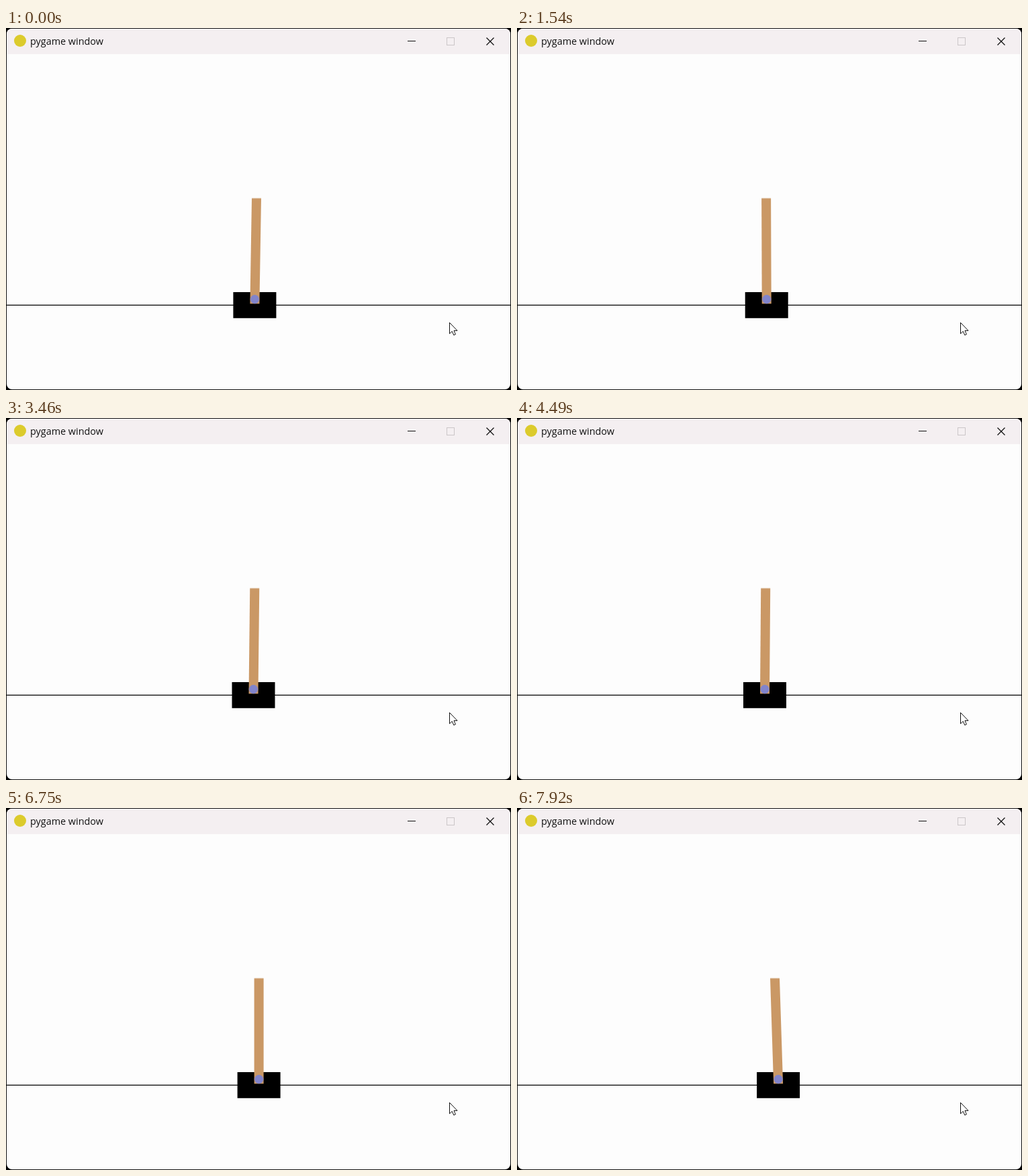
Write an HTML page that moves like this. It is 752 px wide and 540 px high and loops after 7.99 s.

```html
<!DOCTYPE html>
<html lang="en">
<head>
<meta charset="utf-8">
<title>Cart and pole</title>
<style>
  html, body { margin: 0; width: 100%; height: 100%; overflow: hidden; background: #000; }
  svg { display: block; width: 752px; height: 540px; }
  text { font: 14.4px "Open Sans", "Noto Sans", sans-serif; fill: #111; }
</style>
</head>
<body>
<svg viewBox="0 0 752 540">
  <defs>
    <clipPath id="frame"><rect x="1" y="1" width="750" height="538" rx="8"/></clipPath>
  </defs>
  <rect width="752" height="540"/>
  <rect x=".5" y=".5" width="751" height="539" rx="8.5" fill="#222"/>
  <g clip-path="url(#frame)">
    <rect width="752" height="540" fill="#fdfdfd"/>
    <rect width="752" height="39" fill="#f4eff1"/>
  </g>

  <circle cx="21" cy="19" r="9" fill="#dccb2c"/>
  <text x="36" y="25">pygame window</text>
  <g fill="none" stroke="#111">
    <path d="M598 19.5H610"/>
    <rect x="656.5" y="14.5" width="11" height="11" stroke="#cbc6c8"/>
    <path d="M715.5 14.5L726.5 25.5M726.5 14.5L715.5 25.5" stroke-width="1.3"/>
  </g>

  <rect x="1" y="412.8" width="750" height="1.25"/>

  <!-- The cart is drawn around x = 0, the pole stands on the origin. -->
  <g id="cart">
    <rect x="-32" y="394" width="64" height="38.8"/>
    <g transform="translate(0 411.3)">
      <rect id="pole" x="-7" y="-157.3" width="14" height="157.3" fill="#ca9865"/>
    </g>
    <circle cy="404.6" r="6.6" fill="#8184cb"/>
  </g>

  <path d="M660.5 439.5V456L664.3 452.4L666.8 458.2L669.4 457L667 451.4H672Z"
        fill="#fff" stroke="#111"/>
</svg>
<script>
const LOOP = 7990, STEP = 95, POLE_HEIGHT = 157.3;

// Turning points of the sway: when, where the cart is, how far the pole tip leans.
const sway = [
  { at: 0, x: 370.4, lean: 2.6 },
  { at: 410, x: 370.4, lean: 2.6 },
  { at: 820, x: 374.3, lean: -2.6 },
  { at: 2400, x: 368, lean: 2.3 },
  { at: 4490, x: 369, lean: 1.2 },
  { at: 5970, x: 365.4, lean: 3.6 },
  { at: 6750, x: 376.6, lean: 0 },
  { at: 7920, x: 389.1, lean: -5.1 },
  { at: LOOP, x: 389.1, lean: -5.1 }
];

// Moves in even jumps of about STEP ms between turning points.
function play(id, transform) {
  const frames = sway.map((pose, i) => {
    const next = sway[i + 1] || pose;
    const jumps = Math.max(1, Math.round((next.at - pose.at) / STEP));
    return { offset: pose.at / LOOP, transform: transform(pose), easing: `steps(${jumps})` };
  });
  document.getElementById(id).animate(frames, { duration: LOOP, iterations: Infinity });
}

play("cart", ({ x }) => `translateX(${x}px)`);
play("pole", ({ lean }) => `skewX(${-Math.atan(lean / POLE_HEIGHT)}rad)`);
</script>
</body>
</html>
```
